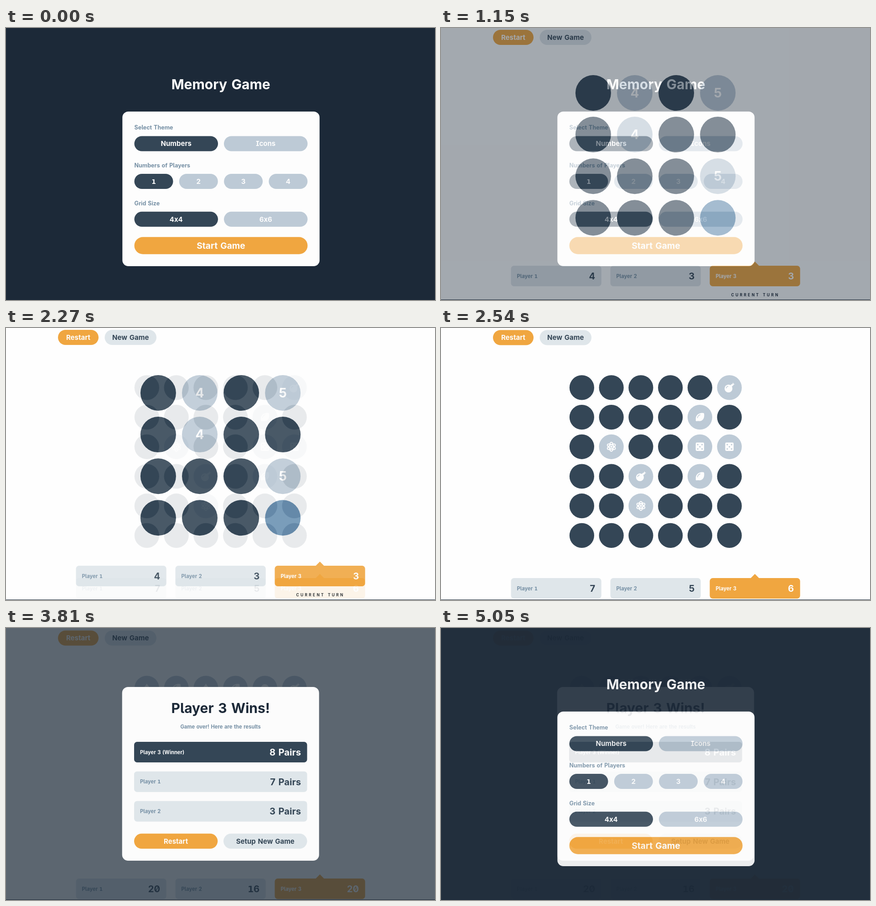
An HTML page that plays this animation: 941x595 px, repeating every 5080 ms.

```html
<!DOCTYPE html>
<html lang="en">
<head>
<meta charset="utf-8">
<title>Memory Game</title>
<style>
  html, body { margin: 0; width: 100%; height: 100%; overflow: hidden; background: #1c2938; }
  svg { display: block; width: 100vw; height: 100vh; }
  text {
    font-family: Inter, "Noto Sans", sans-serif;
    font-weight: 700;
    font-feature-settings: "cv05", "cv08", "zero";
    word-spacing: .08em;
  }
  .one { font-family: "DejaVu Sans", sans-serif; font-size: .92em; }
</style>
</head>
<body>
<svg id="stage" viewBox="0 0 941 595"></svg>
<script>
const NAVY = '#1c2938', DARK = '#344656', IDLE = '#bdcad6', LIGHT = '#dfe6ea',
      GOLD = '#f0a640', BLUE = '#6b92b3', MUTED = '#758fa4', WHITE = '#fdfdfd';
const HOLD = 1000, STEP = 30, SLOT = 1270, COUNT = 4;

const rect = (x, y, w, h, r, fill) =>
  `<rect x="${x}" y="${y}" width="${w}" height="${h}" rx="${r}" fill="${fill}"/>`;

const disc = (x, y, r, fill) => `<circle cx="${x}" cy="${y}" r="${r}" fill="${fill}"/>`;

// y is the middle of the capitals; digit one gets a face with a foot
const text = (s, x, y, size, fill, anchor = 'middle', extra = '') =>
  `<text x="${x}" y="${y + size * .364}" font-size="${size}" fill="${fill}" text-anchor="${anchor}" ${extra}>` +
  s.replace(/1/g, '<tspan class="one">1</tspan>') + '</text>';

const pill = (s, x, y, w, fill, color = WHITE, h = 33, size = 15) =>
  rect(x, y, w, h, h / 2, fill) + text(s, x + w / 2, y + h / 2, size, color);

const row = (label, value, x, y, w, fill, color, valueColor) =>
  rect(x, y, w, 45, 6.5, fill) +
  text(label, x + 13, y + 22.5, 11.2, color, 'start') +
  text(value, x + w - 13.5, y + 22.5, 20.2, valueColor, 'end');

const spread = (n, f) => Array.from({ length: n }, (_, i) => f(i)).join('');

const icons = {
  bomb: disc(-2, 2, 8.6, WHITE) +
    `<path d="M2 -5L5 -8L8 -5L5 -2Z" fill="${WHITE}"/>
     <path d="M8 -11.5L9 -8.5L12 -7.5L9 -6.5L8 -3.5L7 -6.5L5 -7.5L7 -8.5Z" fill="${WHITE}"/>
     <path d="M-7 1.5A5 5 0 0 1 -2.5 -3" fill="none" stroke="${IDLE}" stroke-width="1.5"/>`,
  lemon: `<path d="M9 -8.5C10 -4 10 5 3 8C-1 9.5 -4 8 -6 8.7C-9 9.4 -9.7 7.5 -8.9 5C-9.7 0 -7 -6 -1 -8C3 -9.5 7 -9.7 9 -8.5Z" fill="${WHITE}"/>
     <path d="M-5.5 2C-5 -2 -3 -4.5 1 -5.5" fill="none" stroke="${IDLE}" stroke-width="1.4"/>`,
  atom: `<g fill="none" stroke="${WHITE}" stroke-width="2">` +
    [30, 90, 150].map(a => `<ellipse rx="9.8" ry="4.4" transform="rotate(${a})"/>`).join('') +
    '</g>' + disc(0, 0, 2.4, WHITE),
  dice: rect(-9.2, -9.2, 18.4, 18.4, 2.4, WHITE) + disc(0, 0, 1.6, IDLE) +
    [-4.7, 4.7].map(x => disc(x, -4.7, 1.6, IDLE) + disc(x, 4.7, 1.6, IDLE)).join(''),
  drop: `<path d="M0 -10C2 -5 8 -2 8 4A8 8 0 0 1 -8 4C-8 -2 -2 -5 0 -10Z" fill="${WHITE}"/>`,
  dome: disc(0, 0, 8.5, WHITE)
};

const chip = (x, y, name) =>
  `<g transform="translate(${x} ${y})">` + disc(0, 0, 27.1, name ? IDLE : DARK) + (icons[name] || '') + '</g>';

const page = (fill, body) => `<g><rect width="941" height="595" fill="${fill}"/>${body}</g>`;

function frame(top, bottom, scores) {
  const tip = `<path d="M679 ${bottom + .5}L688.5 ${bottom - 9}L698 ${bottom + .5}Z" fill="${GOLD}"/>`;
  return pill('Restart', 114, top, 89, GOLD) +
    pill('New Game', 216.5, top, 113.5, LIGHT, DARK) + tip +
    spread(3, i => row('Player ' + (i + 1), scores[i], 153.5 + 218 * i, bottom, 198.2,
      i < 2 ? LIGHT : GOLD, i < 2 ? MUTED : WHITE, i < 2 ? DARK : WHITE));
}

function setup() {
  const label = (s, y) => text(s, 281.5, y, 12.5, MUTED, 'start');
  const pair = (a, b, y) => pill(a, 281.5, y, 183.5, DARK) + pill(b, 478, y, 183.5, IDLE);
  return page(NAVY,
    text('Memory Game', 471.2, 123.5, 30, WHITE) +
    rect(255.3, 182.8, 432.5, 338.2, 13, WHITE) +
    label('Select Theme', 217.5) + pair('Numbers', 'Icons', 236.5) +
    label('Numbers of Players', 300.3) +
    spread(4, i => pill('' + (i + 1), 281.5 + 98.3 * i, 319, 85, i ? IDLE : DARK)) +
    label('Grid Size', 383) + pair('4x4', '6x6', 401.8) +
    pill('Start Game', 281.5, 457.3, 380, GOLD, WHITE, 37.5, 19.2));
}

function numbers() {
  const open = { 1: '4', 3: '5', 5: '4', 11: '5' };
  const cell = i => {
    const x = 333.9 + 91.1 * (i % 4), y = 142 + 91.1 * (i >> 2), n = open[i];
    return disc(x, y, 39, n ? IDLE : i === 15 ? BLUE : DARK) + (n ? text(n, x, y, 28, WHITE) : '');
  };
  return page('#fefefe', frame(4, 520, ['4', '3', '3']) + spread(16, cell) +
    text('CURRENT TURN', 636.5, 584, 8.4, NAVY, 'start', 'letter-spacing="3.3"'));
}

function symbols() {
  const open = { 5: 'bomb', 10: 'lemon', 13: 'atom', 16: 'dice', 17: 'dice', 20: 'bomb', 22: 'lemon', 26: 'atom' };
  return page('#fefefe', frame(4.5, 547, ['7', '5', '6']) +
    spread(36, i => chip(308.9 + 64.75 * (i % 6), 130.4 + 64.7 * Math.floor(i / 6), open[i])));
}

function results() {
  const top = ['drop', 'lemon', 'drop', 'lemon', 'dome', 'bomb'];
  return page('#fefefe', frame(5.5, 548, ['20', '16', '20']) +
    spread(6, i => chip(308.9 + 64.75 * i, 131.5, top[i])) +
    `<rect width="941" height="595" fill="${NAVY}" opacity=".71"/>` +
    rect(254.7, 129, 432, 380, 13, '#fcfcfc') +
    text('Player 3 Wins!', 470.7, 175.3, 30, NAVY) +
    text('Game over! Here are the results', 470.6, 215.5, 11.2, MUTED) +
    row('Player 3 (Winner)', '8 Pairs', 281, 249, 379.5, DARK, WHITE, WHITE) +
    row('Player 1', '7 Pairs', 281, 313.7, 379.5, LIGHT, MUTED, DARK) +
    row('Player 2', '3 Pairs', 281, 378.4, 379.5, LIGHT, MUTED, DARK) +
    pill('Restart', 281, 449.8, 183.3, GOLD) +
    pill('Setup New Game', 477, 449.8, 183.5, LIGHT, DARK));
}

const stage = document.getElementById('stage');
stage.innerHTML = setup() + numbers() + symbols() + results() + rect(0, 594, 941, 1, 0, NAVY);
const pages = [...stage.children].slice(0, COUNT);

// Each page holds, then the next one fades in by tenths
function draw(time) {
  const t = time % (SLOT * COUNT);
  const now = Math.floor(t / SLOT), next = (now + 1) % COUNT;
  const rest = t - now * SLOT - HOLD;
  const mix = rest < 0 ? 0 : (Math.floor(rest / STEP) + 1) / 10;
  pages.forEach((p, i) => {
    let a = i === now ? 1 : i === next ? mix : 0;
    // The first page lies below the last, so there the last one fades out
    if (next === 0 && mix) a = i === now ? 1 - mix : i === 0 ? 1 : 0;
    p.setAttribute('opacity', a);
    p.setAttribute('display', a ? 'inline' : 'none');
  });
}

const start = performance.now();
function tick() {
  draw(performance.now() - start);
  requestAnimationFrame(tick);
}
tick();
</script>
</body>
</html>
```
